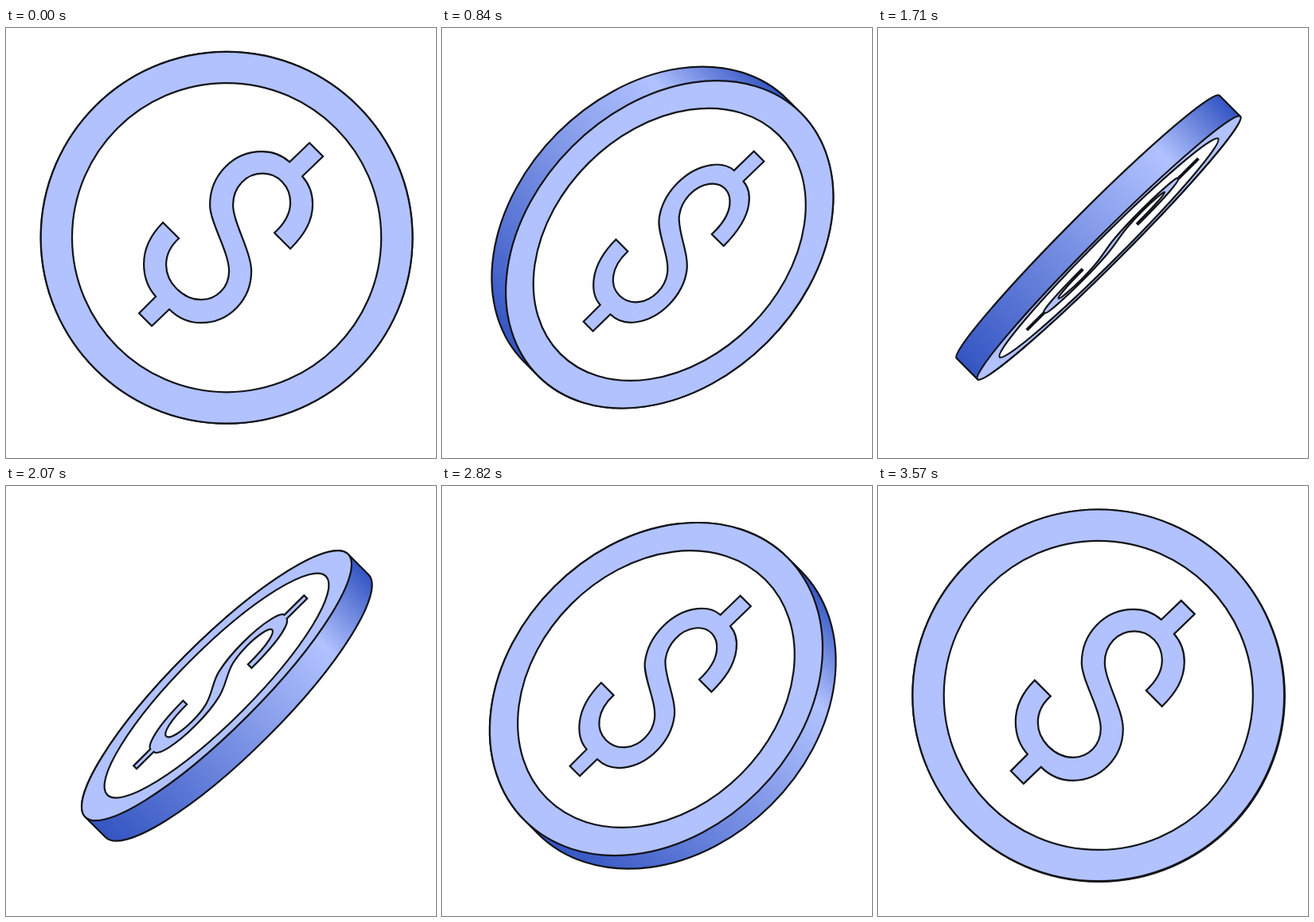
An HTML page with a canvas for the animation above (3.6 s loop, 540 by 540 pixels).

```html
<!DOCTYPE html>
<html lang="en">
<head>
<meta charset="utf-8">
<title>Spinning coin</title>
<style>
  html, body { margin: 0; width: 100%; height: 100%; overflow: hidden; background: #fff; }
  canvas { display: block; width: 540px; height: 540px; }
</style>
</head>
<body>
<canvas id="stage" width="540" height="540"></canvas>
<script>
const ctx = document.getElementById('stage').getContext('2d');

const LOOP = 3600, STEP = 30;
const CX = 277.1, CY = 263.2;
const RADIUS = 233.4, INNER = 194.1;
const FACE_DEPTH = 18.3, BACK_DEPTH = 19;
const LIGHT = '#b1c2ff', DARK = '#3455c2', INK = '#111318';

const dollar = new Path2D(`
  M356 168 C346 159 334 155 321 155 C285 155 256 185 256 222
  C256 244 280 281 280 305 C280 326 264 341 245 341
  C232 341 223 336 214 327 C206 319 201 309 201 297
  C201 284 207 273 217 264 L197 244 C182 259 173 277 173 296
  C173 312 178 326 188 337 L167 358 L183 374 L205 353
  C216 364 230 370 245 370 C280 370 308 341 308 305
  C308 281 285 244 285 222 C285 200 301 182.5 322 182.5
  C342 182.5 357 199 357 219 C357 234 349 246 337 257
  L357 277 C374 260 385 243 385 221 C385 208 381 196 372 186
  L398 161 L381 144 Z`);

const rimShade = ctx.createLinearGradient(-RADIUS, 0, RADIUS, 0);
rimShade.addColorStop(0, DARK);
rimShade.addColorStop(0.78, LIGHT);
rimShade.addColorStop(1, DARK);

function paint(path, fill) {
  ctx.fillStyle = fill;
  ctx.fill(path);
  ctx.stroke(path);
}

function disc(y, radius, squash) {
  const path = new Path2D();
  path.ellipse(0, y, radius, radius * squash, 0, 0, Math.PI * 2);
  return path;
}

// Outline of the whole coin: far half of the back, near half of the face.
function hull(backY, faceY, squash, side) {
  const path = new Path2D(), minor = RADIUS * squash, ccw = side > 0;
  path.ellipse(0, backY, RADIUS, minor, 0, 0, Math.PI, ccw);
  path.ellipse(0, faceY, RADIUS, minor, 0, Math.PI, Math.PI * 2, ccw);
  path.closePath();
  return path;
}

function draw(time) {
  const angle = Math.PI * time / LOOP;
  const squash = Math.abs(Math.cos(angle));
  const side = time < LOOP / 2 ? 1 : -1;
  const tilt = side * Math.sin(angle);
  const faceY = FACE_DEPTH * tilt, backY = -BACK_DEPTH * tilt;

  ctx.setTransform(1, 0, 0, 1, 0, 0);
  ctx.fillStyle = '#fff';
  ctx.fillRect(0, 0, 540, 540);

  // The x axis is now the spin axis, the y axis is foreshortened.
  ctx.translate(CX, CY);
  ctx.rotate(-Math.PI / 4);
  ctx.lineWidth = 2.2;
  ctx.miterLimit = 4;
  ctx.strokeStyle = INK;

  paint(hull(backY, faceY, squash, side), rimShade);
  paint(disc(faceY, RADIUS, squash), LIGHT);
  paint(disc(faceY, INNER, squash), '#fff');

  const sign = new Path2D();
  sign.addPath(dollar, new DOMMatrix()
    .translate(0, faceY).scale(1, squash).rotate(45).translate(-277, -263));
  paint(sign, LIGHT);
}

const start = performance.now();
function tick() {
  const elapsed = (performance.now() - start) % LOOP;
  draw(Math.floor(elapsed / STEP) * STEP);
  requestAnimationFrame(tick);
}
tick();
</script>
</body>
</html>
```
